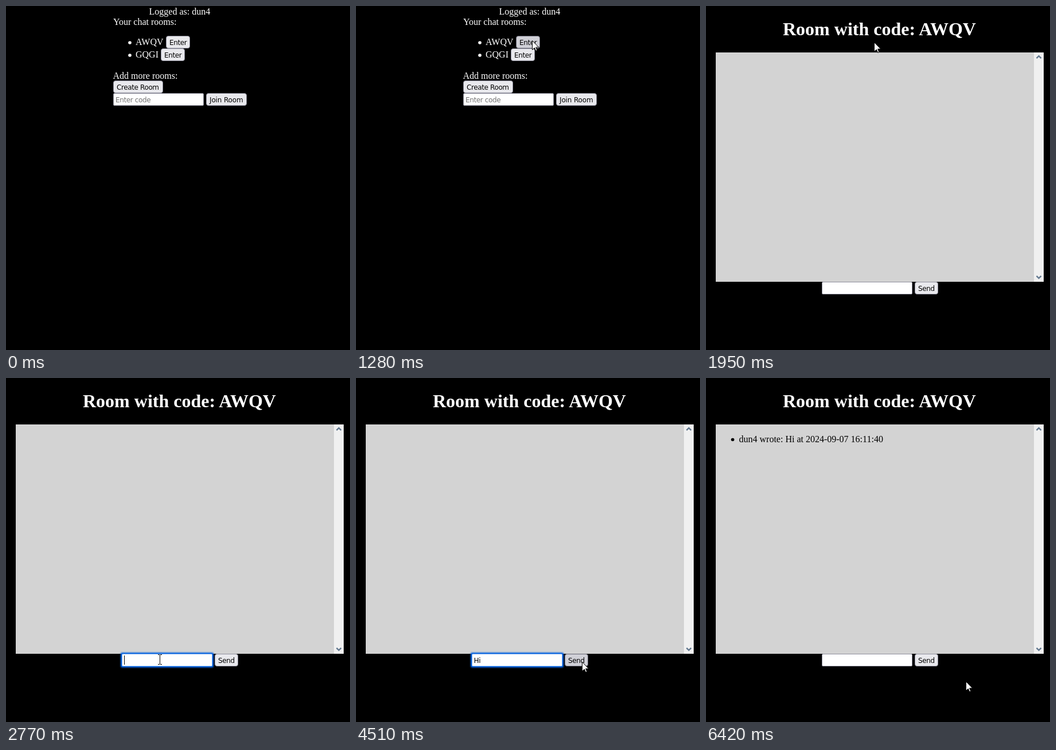
Write an HTML page that moves like this. It is 600 px wide and 600 px high and loops after 8000 ms.

```html
<!DOCTYPE html>
<html lang="en">
<head>
<meta charset="utf-8">
<title>Chat rooms</title>
<style>
  html, body { margin: 0; width: 100%; height: 100%; overflow: hidden; background: #000; }
  svg { display: block; width: 600px; height: 600px; }
  text { font: 16px "Liberation Serif", serif; fill: #fff; white-space: pre; }
  .ui { font: 12px "DejaVu Sans", sans-serif; letter-spacing: -.38px; fill: #000; }
  .hint { fill: #757575; }
  .title { font: bold 32px "Liberation Serif", serif; }
  .dark { fill: #000; }
</style>
</head>
<body>
<svg id="stage" viewBox="0 0 600 600" xmlns="http://www.w3.org/2000/svg"></svg>
<script>
const LOOP = 8000;
const stage = document.getElementById('stage');

function add(parent, tag, attrs, label) {
  const el = document.createElementNS('http://www.w3.org/2000/svg', tag);
  for (const k in attrs) el.setAttribute(k, attrs[k]);
  if (label) el.textContent = label;
  parent.appendChild(el);
  return el;
}
const group = parent => add(parent, 'g', {});
const text = (g, x, y, label, cls = '') => add(g, 'text', { x, y, class: cls }, label);
const dot = (g, cx, cy, fill) => add(g, 'circle', { cx, cy, r: 2.8, fill });
const show = (el, on) => el.setAttribute('visibility', on ? 'inherit' : 'hidden');

// Bordered control, 22px high
function box(g, x, y, w, rx, fill) {
  const el = add(g, 'rect', {
    x: x + .5, y: y + .5, width: w - 1, height: 21, rx, fill, stroke: '#8f8f9d'
  });
  return { el, over: p => p[0] >= x && p[0] < x + w && p[1] >= y && p[1] < y + 22 };
}
function button(g, x, y, w, label, gap) {
  const b = box(g, x, y, w, 3.5, '#e9e9ed');
  const t = text(g, x + 6, y + 16, label, 'ui');
  if (gap) t.style.letterSpacing = gap;
  return b;
}
function paint(b, p, pressed) {
  const hover = b.over(p);
  b.el.setAttribute('fill', pressed ? '#b1b1b9' : hover ? '#d0d0d7' : '#e9e9ed');
  b.el.setAttribute('stroke', hover ? '#676774' : '#8f8f9d');
}

// Room list
const lobby = group(stage);
text(lobby, 249.5, 15, 'Logged as: dun4');
text(lobby, 187, 33, 'Your chat rooms:');
dot(lobby, 216, 64, '#fff');
text(lobby, 226, 68, 'AWQV');
const enter = button(lobby, 279, 52, 42, 'Enter');
dot(lobby, 216, 86, '#fff');
text(lobby, 226, 90, 'GQGI');
button(lobby, 270, 74, 42, 'Enter');
text(lobby, 186.5, 127, 'Add more rooms:');
button(lobby, 187, 130, 87, 'Create Room');
box(lobby, 187, 152, 158, 1.5, '#fff');
text(lobby, 191, 168, 'Enter code', 'ui hint');
button(lobby, 349, 152, 71, 'Join Room', '-.15px');

// Chat room
const room = group(stage);
text(room, 134, 51, 'Room with code: AWQV', 'title');
add(room, 'rect', { x: 17, y: 81, width: 555, height: 400, fill: '#d3d3d3' });
add(room, 'rect', { x: 572, y: 81, width: 17, height: 400, fill: '#f0f0f0' });
add(room, 'path', {
  d: 'M576.5 91.2l4-4 4 4M576.5 470.8l4 4 4-4',
  fill: 'none', stroke: '#62788f', 'stroke-width': 2.4
});
const message = group(room);
dot(message, 46.5, 107.5, '#000');
text(message, 57.5, 112, 'dun4 wrote: Hi at 2024-09-07 16:11:40', 'dark');
const input = box(room, 202, 481, 158, 1.5, '#fff');
const send = button(room, 364, 481, 41, 'Send');
const ring = group(room);
add(ring, 'rect', { x: 198, y: 477, width: 166, height: 30, rx: 5, fill: '#0060df', opacity: .12 });
add(ring, 'rect', { x: 199, y: 478, width: 164, height: 28, rx: 4, fill: '#0060df', opacity: .28 });
add(ring, 'rect', {
  x: 201.5, y: 480.5, width: 159, height: 23, rx: 2, fill: '#fff', stroke: '#0060df', 'stroke-width': 2
});
const typed = text(room, 205.5, 497, '', 'ui');
const caret = add(room, 'rect', { y: 484, width: 1, height: 16, fill: '#000' });

// Pointers
const arrow = add(stage, 'path', {
  d: 'M.5 .5V16.5L4.3 12.9 6.7 18.3 8.9 17.4 6.6 12H11.7Z', fill: '#fff', stroke: '#000'
});
const beam = add(stage, 'path', {
  d: 'M-3 -8.5H0M1 -8.5H4M.5 -8V8M-3 8.5H0M1 8.5H4', fill: 'none', stroke: '#000'
});

// Pointer legs: stepped moves with an optional upward bow
const legs = [
  { start: 910, end: 1380, steps: 10, from: [583, 45], to: [293, 63], bow: 15, appear: true },
  { start: 2250, end: 2470, steps: 5, from: [293, 63], to: [268, 491], bow: 0 },
  { start: 4240, end: 4510, steps: 6, from: [268, 491], to: [394, 495], bow: 0, appear: true },
  { start: 4960, end: 5110, steps: 4, from: [394, 495], to: [452, 529], bow: 0 },
  { start: 6420, end: 6420, steps: 1, from: [452, 529], to: [453, 529], bow: 0 }
];
function pointer(t) {
  const leg = legs.filter(l => t >= l.start).pop();
  if (!leg) return [-50, -50];
  const { start, end, steps, from, to, bow, appear } = leg;
  const gap = (end - start) / (steps - 1) || 1;
  const n = Math.min(steps - 1, Math.floor((t - start) / gap + .001));
  const u = appear ? n / (steps - 1) : (n + 1) / steps;
  const e = u * (2 - u);
  const at = i => from[i] + (to[i] - from[i]) * e;
  return [Math.round(at(0)), Math.round(at(1) - bow * Math.sin(Math.PI * e))];
}
const within = (t, a, b) => t >= a && t < b;

function draw(t) {
  const p = pointer(t);
  const inRoom = t >= 1950;
  const focused = within(t, 2670, 4710);
  const hidden = t < 910 || within(t, 3530, 4240);
  show(lobby, !inRoom);
  show(room, inRoom);
  paint(enter, p, within(t, 1840, 1890));
  paint(send, p, within(t, 4710, 4810));
  input.el.setAttribute('stroke', input.over(p) && !hidden ? '#676774' : '#8f8f9d');
  show(message, t >= 4810);
  show(ring, focused);

  typed.textContent = within(t, 3530, 4810) ? (t < 3790 ? 'H' : 'Hi') : '';
  caret.setAttribute('x', t < 3530 ? 206 : t < 3790 ? 214 : 217);
  show(caret, within(t, 2770, 3280) || within(t, 3530, 3790) || within(t, 3890, 4400));

  const overInput = inRoom && input.over(p);
  const place = `translate(${p[0]} ${p[1]})`;
  arrow.setAttribute('transform', place);
  beam.setAttribute('transform', place);
  show(arrow, !hidden && !overInput);
  show(beam, !hidden && overInput);
}

const began = performance.now();
function tick() {
  draw((performance.now() - began) % LOOP);
  requestAnimationFrame(tick);
}
draw(0);
requestAnimationFrame(tick);
</script>
</body>
</html>
```
